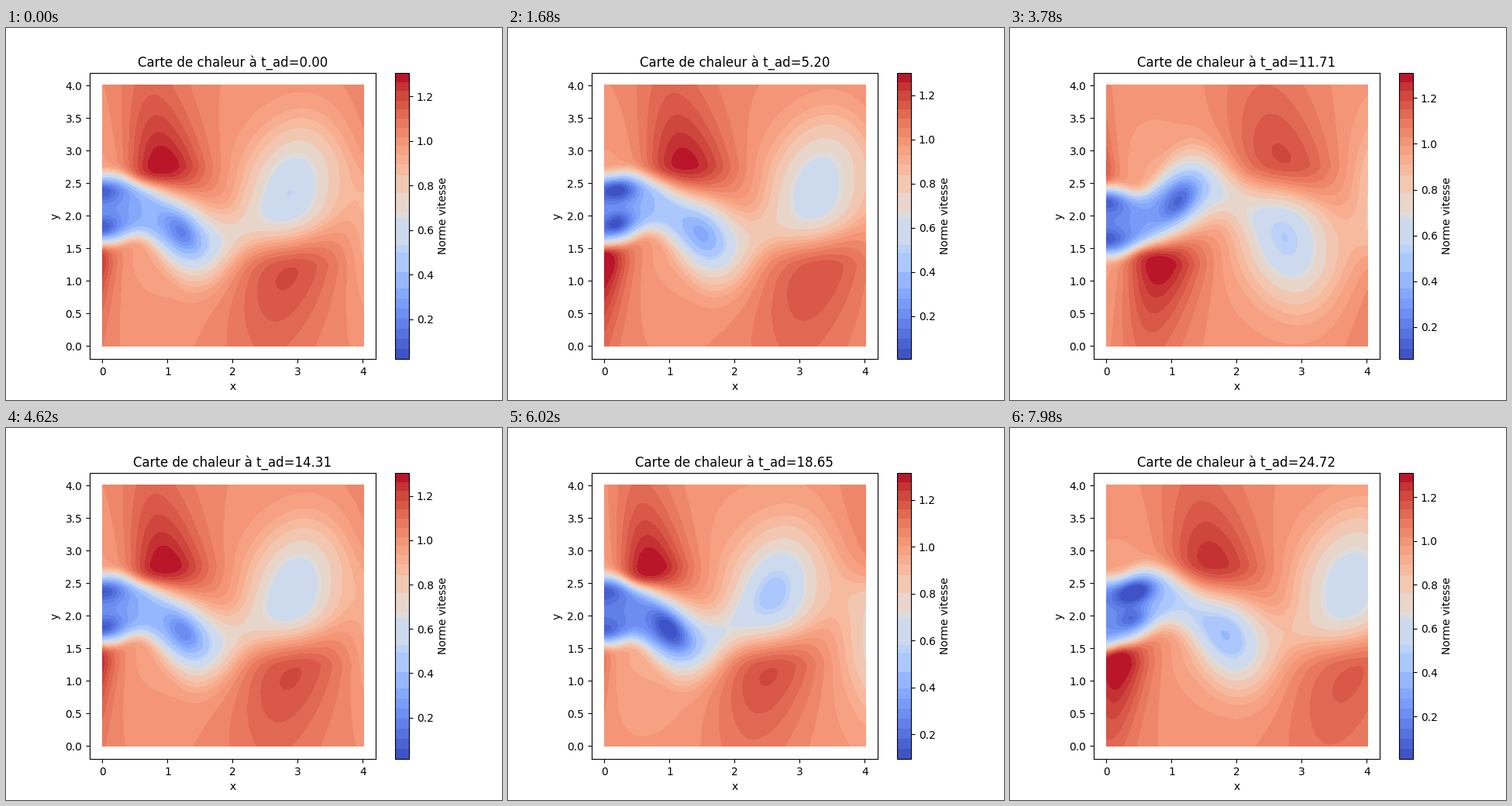
Recreate the animation shown at these times as a matplotlib script. Size 640 by 480 pixels, loop 8000 ms.

```python
import matplotlib.pyplot as plt
import numpy as np
from matplotlib.animation import FuncAnimation
from matplotlib.colors import ListedColormap

STEP_MS, TICK_MS, LOOP_MS = 140, 40, 8000
STEPS = LOOP_MS // STEP_MS + 1
DT = 0.43373            # simulated time per step
PERIOD = 4.75           # shedding period
HALF = PERIOD / 2
OMEGA = 2 * np.pi / PERIOD
DRIFT, PULL = 0.42, 0.04    # a vortex of age a sits at x = DRIFT a + PULL a^2
N = 169

axis = (np.arange(N) + 0.5) * 4 / N
X, Y = np.meshgrid(axis, axis)
AGE = (np.sqrt(DRIFT ** 2 + 4 * PULL * X) - DRIFT) / (2 * PULL)


def bump(v, center, width):
    return np.exp(-((v - center) / width) ** 2)


def blob(y, cx, cy, major, minor, tilt):
    c, s = np.cos(np.radians(tilt)), np.sin(np.radians(tilt))
    dx, dy = X - cx, y - cy
    u, v = c * dx + s * dy, c * dy - s * dx
    return np.exp(-0.5 * ((u / major) ** 2 + (v / minor) ** 2))


def wake(phase):
    """Shape (0 to 1) and depth of the meandering slow band."""
    sway = 0.1 + 0.35 * (1 - np.exp(-X ** 2))
    lead = 0.7 * (1 - np.exp(-X / 0.4))
    mid = 2 + sway * np.cos(phase + lead)
    width = 0.54 - 0.14 * np.sin(phase) ** 2 * (1 - bump(X, 0, 0.4))
    power = 2 + 4 * bump(X, 0, 0.8)
    shape = np.exp(-np.abs((Y - mid) / width) ** power)
    depth = 0.04 + 0.75 * np.exp(-(X / 1.6) ** 1.8)
    return shape, depth


def outer_wave(phase):
    """Speed-up and slow-down of the stream outside the band."""
    far = np.maximum(np.abs(Y - 2) - 0.75, 0)
    lag = 0.75 * bump(X, 0, 2) + 0.3 * far
    c = -np.tanh((Y - 2) / 0.4) * np.cos(phase - lag)
    fast = 0.36 * np.exp(-X / 10) * ((1 + c) / 2) ** 3
    slow = 0.08 * (1 - c) / 2
    return (fast - slow) * np.exp(-far)


def vortex(age, side):
    """Slow spots of one shed vortex; side is +1 above, -1 below."""
    y = 2 + side * (Y - 2)
    old = max(age, 0)
    ex = DRIFT * old + PULL * old ** 2
    ey = 2.1 + 0.055 * old + 0.27 * np.exp(-(old / 1.4) ** 4)
    tilt = 75 * (1 - bump(old, 0, 1.8))
    lead = 0.2 * np.exp(-(old / 3.3) ** 4)

    core = 0.37 * bump(age, 1.2, 1.45)
    broad = 0.42 * (1 - np.exp(-(old / 2.6) ** 2.5))
    twin = 0.26 * bump(age, 0.5, 0.9)
    v = core * blob(y, ex, ey, 0.2 + 0.035 * old, 0.11 + 0.025 * old, tilt)
    v += broad * blob(y, ex + lead, ey + 0.6 * lead,
                      0.25 + 0.09 * old, 0.2 + 0.05 * old, tilt)
    v += twin * blob(y, DRIFT * old, 1.8 + 0.16 * age, 0.17, 0.11, 20)
    return v


def speed(t):
    phase = OMEGA * (t - AGE)
    shape, depth = wake(phase)
    v = 1.03 + outer_wave(phase) * (1 - shape) - depth * shape
    newest = int(np.floor((t + 1.1) / HALF))
    for n in range(newest - 3, newest + 1):
        v -= vortex(t - n * HALF, 1 if n % 2 == 0 else -1)
    return v


def color_range(t):
    beat = 2 * OMEGA
    low = 0.005 + 0.09 * ((1 + np.cos(beat * (t + 0.35))) / 2) ** 8
    high = 1.312 - 0.01 * np.cos(beat * (t - 0.38))
    return low, high


def banded(name):
    edges = np.r_[0:.245:8j, .303, .371, .398, .49, .515, .58, .64, .68:1:11j]
    mids = (edges[:-1] + edges[1:]) / 2
    band = np.digitize(np.linspace(0, 1, 512), edges[1:-1])
    return ListedColormap(plt.get_cmap(name)(mids[band]))


times = DT * np.arange(STEPS)
fields = [speed(t) for t in times]

fig, ax = plt.subplots(figsize=(6.4, 4.8), dpi=100)
edge = (-0.006, 4.006)
image = ax.imshow(fields[0], origin="lower", extent=edge * 2,
                  cmap=banded("coolwarm"), interpolation="bicubic",
                  interpolation_stage="data")
image.set_clim(*color_range(0))
ax.set(xlim=(-0.195, 4.195), ylim=(-0.2, 4.2), xlabel="x", ylabel="y",
       xticks=range(5), yticks=np.arange(0, 4.1, 0.5))
fig.colorbar(image, ax=ax, label="Norme vitesse")
title = ax.set_title("")


def update(i):
    k = (i * TICK_MS + TICK_MS // 2) // STEP_MS
    image.set_data(fields[k])
    image.set_clim(*color_range(times[k]))
    title.set_text(f"Carte de chaleur à t_ad={times[k]:.2f}")
    return image, title


anim = FuncAnimation(fig, update, frames=LOOP_MS // TICK_MS,
                     interval=TICK_MS, repeat=True, repeat_delay=0)
plt.show()
```
